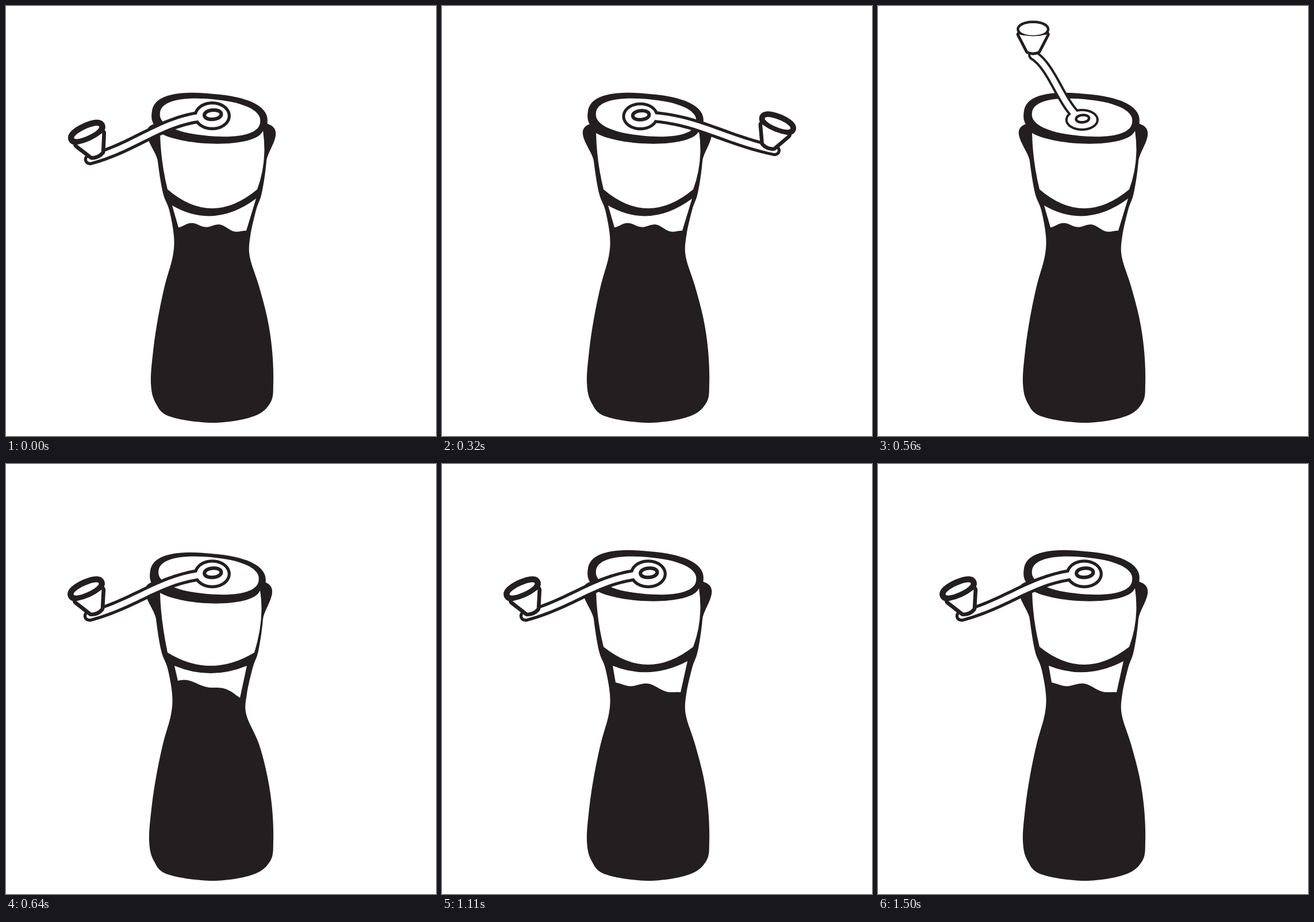
These frames come from a looping animation (748x748 px, 1630 ms). An HTML page:

```html
<!DOCTYPE html>
<html lang="en">
<head>
<meta charset="utf-8">
<title>Coffee grinder</title>
<style>
  html, body { margin: 0; width: 100%; height: 100%; overflow: hidden; background: #fff; }
  svg { display: block; width: 100vw; height: 100vh; }
</style>
</head>
<body>
<svg id="stage" viewBox="0 0 748 748"></svg>
<script>
const INK = '#231f20', PAPER = '#fff';
const stage = document.getElementById('stage');
const { sin, cos, abs, sign, PI, max, min, exp, hypot } = Math;
const mix = (a, b, t) => a + (b - a) * t;
const range = (n, f) => Array.from({ length: n + 1 }, (_, i) => f(i / n));

const poly = pts => 'M' + pts.map(p => p.join(' ')).join('L') + 'Z';

// Closed Catmull-Rom curve through a few points.
function smooth(pts) {
  const at = i => pts[(i + pts.length) % pts.length];
  const handle = (i, k) => at(i).map((v, a) => v + k * (at(i + 1)[a] - at(i - 1)[a]) / 6);
  return 'M' + pts[0] + pts.map((_, i) => `C${handle(i, 1)} ${handle(i + 1, -1)} ${at(i + 1)}`).join('');
}

// Tilted superellipse; n = 2 is a plain ellipse.
function oval(x, y, rx, ry, tilt = 0, n = 2) {
  const a = tilt * PI / 180, bend = v => sign(v) * abs(v) ** (2 / n);
  return poly(range(72, t => {
    const u = rx * bend(cos(2 * PI * t)), v = ry * bend(sin(2 * PI * t));
    return [x + u * cos(a) - v * sin(a), y + u * sin(a) + v * cos(a)];
  }));
}

// Band of varying half width along a cubic curve.
function ribbon(p, half) {
  const point = t => [0, 1].map(k => mix(
    mix(mix(p[0][k], p[1][k], t), mix(p[1][k], p[2][k], t), t),
    mix(mix(p[1][k], p[2][k], t), mix(p[2][k], p[3][k], t), t), t));
  const side = s => range(28, t => {
    const [x, y] = point(t), [a, b] = point(t - .01), [c, d] = point(t + .01);
    const k = s * half(t) / hypot(c - a, d - b);
    return [x - (d - b) * k, y + (c - a) * k];
  });
  return poly([...side(1), ...side(-1).reverse()]);
}

const fill = (d, color) => `<path d="${d}" fill="${color}"/>`;

// White shapes that share one ink outline.
const outlined = (line, ...shapes) =>
  `<g stroke="${INK}" stroke-width="${2 * line}" stroke-linejoin="round">` +
  shapes.map(d => fill(d, INK)).join('') + '</g>' + shapes.map(d => fill(d, PAPER)).join('');

// Silhouette: height, left edge, right edge.
const profile = [
  [205, 258, 455], [270, 264, 453], [325, 273, 445], [355, 284, 435], [400, 292, 425], [436, 290, 424],
  [487, 276, 440], [545, 264, 455], [600, 256, 463], [655, 252, 465], [690, 260, 460], [714, 285, 430]
];

function body({ lean, rim, ends, ring, glass, crest, period }) {
  const left = profile.map(([y, l]) => [l + lean * .6, y]);
  const right = profile.map(([y, , r]) => [r + (y < 450 ? lean * 1.2 : 0), y]);
  const [tl, tr, br, bl] = glass;

  const l = 268, r = 447 + lean, top = rim - 20;
  const pane = `M${l} ${top}C310 ${rim + 4} ${r - 12} ${rim + 7} ${r} ${rim - 24}` +
    `Q${r + 8} 270 ${r - 10} ${ends}Q${358 + lean / 2} ${2 * ring - ends} 281 ${ends}Q269 270 ${l} ${top}Z`;

  const coffee = range(30, t => {
    const u = 1 - t;
    return [mix(bl[0], br[0], u),
      mix(bl[1], br[1], u) - 6 * sin(PI * u) - 3.5 * cos(2 * PI * (u - crest) / period)];
  });
  const belly = 2 * (ring + 13) - (tl[1] + tr[1]) / 2;
  const strip = `M${tl}Q${(tl[0] + tr[0]) / 2} ${belly} ${tr}L${coffee.join('L')}Z`;

  return fill(smooth([...right, [360, 725], ...left.reverse()]), INK) +
    fill(oval(354 + lean * .6, rim - 45.5, 101, 43, 5, 2.5), INK) +
    [oval(355 + lean * .5, 194, 87.5, 32, 5, 2.3), pane, strip].map(d => fill(d, PAPER)).join('');
}

const bodies = {
  A: body({ lean: 0, rim: 241, ends: 319, ring: 352, crest: .19, period: .42,
    glass: [[289, 347], [435, 335], [418, 394], [300, 382]] }),
  B: body({ lean: -5, rim: 244, ends: 328, ring: 351, crest: .13, period: .65,
    glass: [[293, 351], [419, 351], [407, 405], [299, 378]] }),
  C: body({ lean: 0, rim: 240, ends: 318, ring: 349, crest: .5, period: .55,
    glass: [[297, 351], [427, 343], [415, 400], [302, 383]] })
};

function knob(x, y, turn, depth, near) {
  const cup = `M-24 0Q0 6 24 0L9 ${depth}Q0 ${depth + 4} -9 ${depth}Z`;
  const lip = oval(0, -9 - 4 * near, 24, 10.5 - 5 * near);
  return `<g transform="translate(${x} ${y}) rotate(${turn})">` +
    `<path d="${lip}" fill="${INK}" stroke="${INK}" stroke-width="${9 + 14 * near}"/>` +
    outlined(5 + 2 * near, cup) + fill(lip, PAPER) + '</g>';
}

// The knob runs on a flat orbit; 0 degrees points at the viewer, 90 to the right.
function crank(angle) {
  const a = angle * PI / 180, s = sin(a), c = cos(a);
  const near = max(0, min(1, c + .6));   // seen from the front half
  const face = max(0, c) ** 3;           // arm pointing at the viewer
  const x = 360 + 222 * s, y = 191 + 155 * c, depth = 29 - 14 * face;
  const hx = 352 - 7 * s, hy = 198 - 8 * near - 3 * face;
  const dx = x - hx, dy = y + depth + 7 - hy, lift = 8 * abs(s);
  const arm = [[hx, hy], [hx + .4 * dx, hy + .15 * dy - lift], [hx + .6 * dx, hy + .8 * dy - lift], [hx + dx, hy + dy]];

  return outlined(4 + 1.5 * near,
      oval(hx, hy, 25 + 2 * near + 11 * face, 15 + 5.5 * near + 2 * face),
      ribbon(arm, t => 5 + 30 * face * exp(-6 * t)),
      oval(x, hy + dy, 4.5 + 4 * face, 4.5 + 4 * face)) +
    outlined(4.5 + 2 * near, oval(hx + 1, hy - 2, 9 + 3 * near, 4 + near, -5)) +
    knob(x, y, 30 * s * near, depth, near);
}

// One full turn of the crank, then the drawings keep trembling at rest.
const turn = [-75, -40, -4, 39, 81, 124, 160, 204, 236];
const drawing = n => bodies['CAB'[max(1, n) % 3]];
const steps = [
  ...turn.map((angle, i) => ({ hold: i < 7 ? 80 : 40, art: drawing(min(i, 7)) + crank(angle) })),
  ...range(7, t => t * 7).map(i => ({ hold: i ? 130 : 80, art: drawing(8 + Math.round(i)) + crank(-76) }))
];
const loop = steps.reduce((sum, step) => sum + step.hold, 0);

let shown;
function draw(time) {
  let t = time % loop, i = 0;
  while (t >= steps[i].hold) t -= steps[i++].hold;
  if (i === shown) return;
  shown = i;
  stage.innerHTML = steps[i].art;
}

const start = performance.now();
function tick() {
  draw(performance.now() - start);
  requestAnimationFrame(tick);
}
tick();
</script>
</body>
</html>
```
